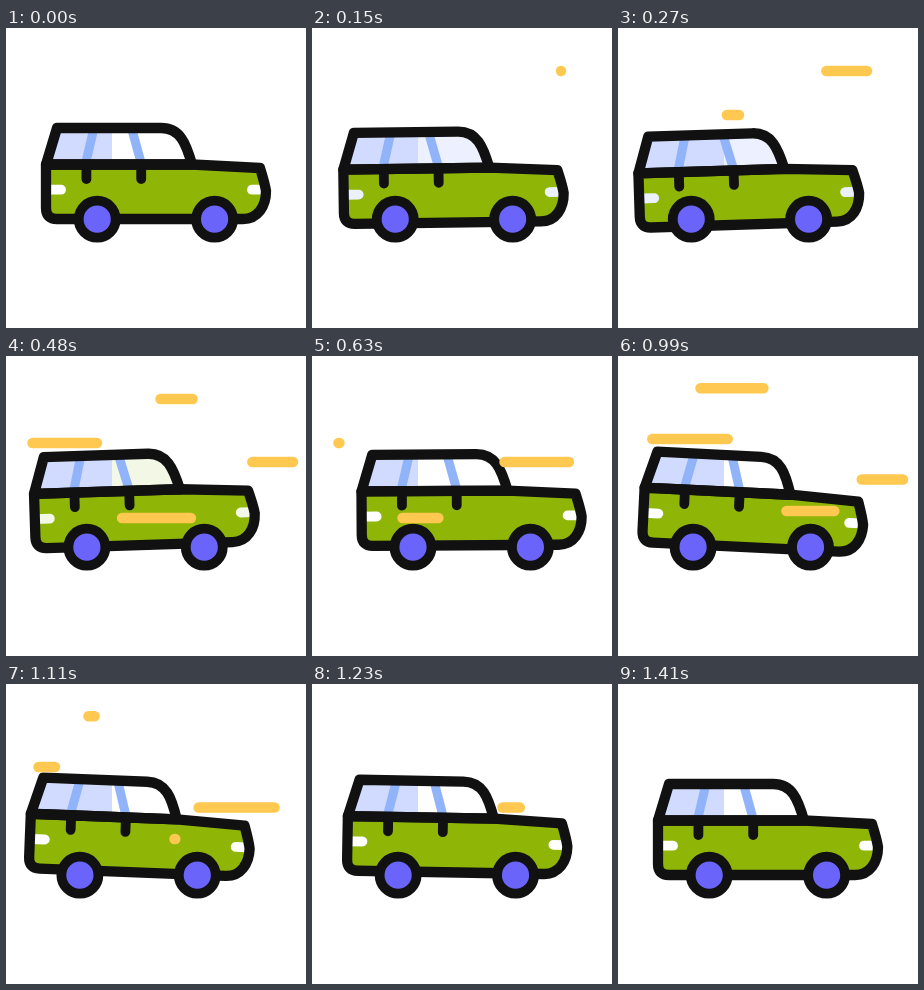
An HTML page with a canvas that plays this animation: 300x300 px, repeating every 1500 ms.

```html
<!DOCTYPE html>
<html lang="en">
<head>
<meta charset="utf-8">
<title>Driving car</title>
<style>
  html, body { margin: 0; width: 100%; height: 100%; overflow: hidden; background: #fff; }
  canvas { display: block; width: 300px; height: 300px; }
</style>
</head>
<body>
<canvas id="stage"></canvas>
<script>
const LOOP = 1500, STEP = 30;
const INK = '#111', GREEN = '#8fb507', BLUE = '#6a64fa';
const GLASS = '#d1dbff', PILLAR = '#91b3fa', STREAK = '#ffc850';

// [time, value] keys, eased in and out between neighbours
const SHIFT = [[0, 0], [350, -20.5], [700, 13], [1060, -19], [1320, 0]];
const BOUNCE = [[0, 0], [250, 5.5], [540, -3], [840, 3], [1170, -3], [1400, 0]];
const TILT = [[0, 0], [375, -2.2], [985, 2.8], [1400, 0]];

// speed streaks: right end, y, start time
const STREAKS = [
  [254, 43, 147], [126, 87, 207], [190, 162, 304], [292, 106, 357],
  [268, 155, 686], [182, 32.2, 714], [132, 83, 744], [290, 123.5, 866]
];
const RUN = 94.5, GROW = 270, LAG = 170;

const canvas = document.getElementById('stage');
const ctx = canvas.getContext('2d');
const dpr = window.devicePixelRatio || 1;
canvas.width = canvas.height = 300 * dpr;

const body = new Path2D('M40 136.5 V180 Q40 191 51 191 H237 C252 191 260 178 260 163 Q259 156 254 140 L186 136.5 Z');
const cabin = new Path2D('M40 136.5 L51 100 H155 C174 100 180 115 186 136.5 Z');

const ease = p => (1 - Math.cos(Math.PI * Math.min(1, Math.max(0, p)))) / 2;

function sample(keys, t) {
  for (let i = 1; i < keys.length; i++) {
    const [t0, a] = keys[i - 1], [t1, b] = keys[i];
    if (t < t1) return a + (b - a) * ease((t - t0) / (t1 - t0));
  }
  return keys[keys.length - 1][1];
}

function line(x1, y1, x2, y2, color, width, cap = 'round') {
  ctx.beginPath();
  ctx.moveTo(x1, y1);
  ctx.lineTo(x2, y2);
  ctx.strokeStyle = color;
  ctx.lineWidth = width;
  ctx.lineCap = cap;
  ctx.stroke();
}

function outline(path) {
  ctx.strokeStyle = INK;
  ctx.lineWidth = 10.3;
  ctx.lineJoin = 'round';
  ctx.stroke(path);
}

function wheel(x) {
  ctx.beginPath();
  ctx.arc(x, 191.2, 18.5, 0, 2 * Math.PI);
  ctx.fillStyle = BLUE;
  ctx.fill();
  ctx.strokeStyle = INK;
  ctx.lineWidth = 9.8;
  ctx.stroke();
}

function paleTone(t) {
  if (t >= 150 && t < 390) return '#edf1ff';
  if (t >= 390 && t < 600) return '#f3f8e6';
  return '#fff';
}

function drawBody(t, shift) {
  const pale = paleTone(t);
  ctx.save();
  ctx.translate(150 + shift, 190 + sample(BOUNCE, t));
  ctx.rotate(sample(TILT, t) * Math.PI / 180);
  ctx.translate(-150, -190);

  // windows: the tint stops at a fixed place on the stage
  ctx.save();
  ctx.clip(cabin);
  ctx.fillStyle = pale;
  ctx.fillRect(0, 80, 300, 70);
  const pose = ctx.getTransform();
  ctx.setTransform(dpr, 0, 0, dpr, 0, 0);
  ctx.fillStyle = GLASS;
  ctx.fillRect(0, 0, 106, 300);
  ctx.setTransform(pose);
  line(88, 100, 79, 138, PILLAR, 9, 'butt');
  line(125.5, 100, 136, 138, PILLAR, 9, 'butt');
  ctx.restore();

  ctx.fillStyle = GREEN;
  ctx.fill(body);
  line(42, 161.7, 55, 161.7, pale, 9.8);
  line(246, 161.7, 257, 161.7, pale, 9.8);
  outline(cabin);
  outline(body);
  for (const x of [80.4, 135.2]) line(x, 137, x, 151, INK, 9.8);
  ctx.restore();
}

function drawStreak([right, y, start], t) {
  const head = ease((t - start) / GROW);
  const tail = ease((t - start - LAG) / GROW);
  if (head <= tail) return;
  const x = right - 5;
  line(x - tail * RUN, y, x - head * RUN, y, STREAK, 10.5);
}

function draw(t) {
  const shift = sample(SHIFT, t);
  ctx.setTransform(dpr, 0, 0, dpr, 0, 0);
  ctx.fillStyle = '#fff';
  ctx.fillRect(0, 0, 300, 300);
  drawBody(t, shift);
  wheel(91.2 + shift);
  wheel(208.6 + shift);
  for (const streak of STREAKS) drawStreak(streak, t);
}

const begin = performance.now();
function tick() {
  const t = (performance.now() - begin) % LOOP;
  draw(Math.floor(t / STEP) * STEP);
  requestAnimationFrame(tick);
}
tick();
</script>
</body>
</html>
```
